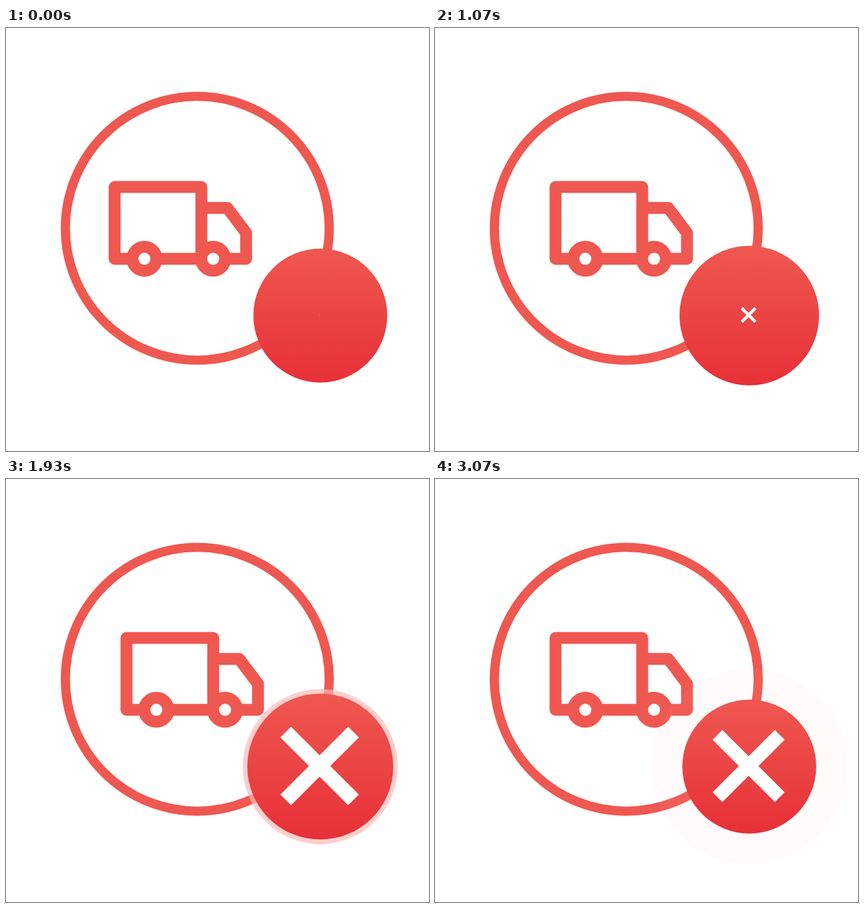
Write an HTML page with a canvas that moves like this. It is 640x640 px and loops after 3570 ms.

```html
<!DOCTYPE html>
<html lang="en">
<head>
<meta charset="utf-8">
<title>Delivery failed</title>
<style>
html, body { margin: 0; width: 100%; height: 100%; overflow: hidden; background: #fff; }
canvas { display: block; width: 640px; height: 640px; }
</style>
</head>
<body>
<canvas id="stage" width="640" height="640"></canvas>
<script>
const ctx = document.getElementById('stage').getContext('2d');
const LOOP = 3570, FPS = 14, LAST = 43;
const RED = '#ef5850';
const TRUCK_BASE = 376.2;
const BADGE = { x: 475.5, y: 435.1, r: 101.3 };

// Piecewise linear value through [time, value] keys.
function track(t, keys) {
  if (t <= keys[0][0]) return keys[0][1];
  for (let i = 1; i < keys.length; i++) {
    const [t0, v0] = keys[i - 1], [t1, v1] = keys[i];
    if (t < t1) return v0 + (v1 - v0) * (t - t0) / (t1 - t0);
  }
  return keys[keys.length - 1][1];
}

function circle(x, y, r) {
  ctx.beginPath();
  ctx.arc(x, y, r, 0, Math.PI * 2);
}

function poly(points, closed) {
  ctx.beginPath();
  points.forEach(([x, y]) => ctx.lineTo(x, y));
  if (closed) ctx.closePath();
  ctx.stroke();
}

function drawRing() {
  ctx.strokeStyle = RED;
  ctx.lineWidth = 13.9;
  circle(289.4, 303, 199.6);
  ctx.stroke();
}

function drawTruck(t) {
  const shift = track(t, [[0, -18], [1000, 0]]);
  const squash = track(t, [[0, 1], [500, 0.9625], [1000, 1]]);
  ctx.save();
  ctx.translate(shift, TRUCK_BASE);
  ctx.scale(1, squash);
  ctx.translate(0, -TRUCK_BASE);
  ctx.strokeStyle = RED;
  ctx.lineWidth = 18;
  ctx.lineJoin = 'round';
  poly([[182.3, 240.6], [313.5, 240.6], [313.5, 349.2], [182.3, 349.2]], true);
  poly([[313.5, 272.3], [353, 272.3], [381.3, 310], [381.3, 349.2], [313.5, 349.2]], false);
  ctx.fillStyle = '#fff';
  for (const x of [227.4, 331.4]) {
    circle(x, 349.2, 18.1);
    ctx.fill();
    ctx.stroke();
  }
  ctx.restore();
}

function drawHalo(t) {
  const age = t - 1340;
  if (age <= 0) return;
  ctx.fillStyle = `rgba(255, 185, 182, ${Math.max(0, 1 - age / 1830)})`;
  circle(BADGE.x, BADGE.y, BADGE.r + age * 0.0273);
  ctx.fill();
}

function drawBadge(t) {
  const pulse = track(t, [[800, 1], [1735, 1.1455], [2240, 1]]);
  const cross = pulse * track(t, [[925, 0.01], [1648, 1]]);
  const r = BADGE.r * pulse;
  const fill = ctx.createLinearGradient(0, BADGE.y - r, 0, BADGE.y + r);
  fill.addColorStop(0, '#ef5850');
  fill.addColorStop(1, '#e73038');
  ctx.fillStyle = fill;
  circle(BADGE.x, BADGE.y, r);
  ctx.fill();

  ctx.save();
  ctx.translate(474.5, 434.2);
  ctx.scale(cross, cross);
  ctx.strokeStyle = '#fff';
  ctx.lineWidth = 21;
  const h = 47.1;
  poly([[-h, -h], [h, h]], false);
  poly([[h, -h], [-h, h]], false);
  ctx.restore();
}

// The picture advances in 14 fps steps on a 10 ms clock, then holds.
function stepTime(ms) {
  const tick = Math.floor(ms / 10) * 10 + 5;
  return Math.min(LAST, Math.floor(tick * FPS / 1000)) * 1000 / FPS;
}

function render(now) {
  const t = stepTime(now % LOOP);
  ctx.fillStyle = '#fff';
  ctx.fillRect(0, 0, 640, 640);
  drawRing();
  drawTruck(t);
  drawHalo(t);
  drawBadge(t);
}

let start = null;
function loop() {
  const now = performance.now();
  if (start === null) start = now;
  render(now - start);
  requestAnimationFrame(loop);
}
loop();
</script>
</body>
</html>
```
